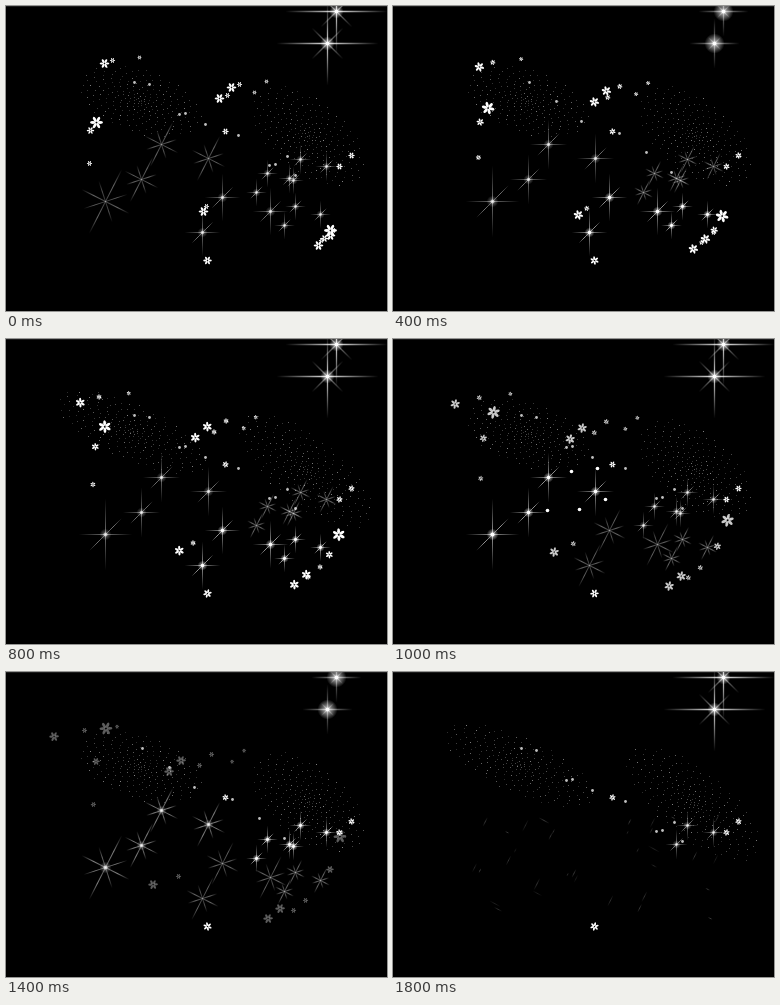
An HTML page with a canvas for the animation above (2000 ms loop, 381 by 305 pixels).

```html
<!DOCTYPE html>
<html lang="en">
<head>
<meta charset="utf-8">
<title>Night sparkle</title>
<style>
html, body { margin: 0; width: 100%; height: 100%; overflow: hidden; background: #000; }
canvas { display: block; }
</style>
</head>
<body>
<canvas id="sky" width="381" height="305"></canvas>
<script>
const canvas = document.getElementById('sky');
const ctx = canvas.getContext('2d');
const STEP = 200, STEPS = 10, TAU = Math.PI * 2;

const white = a => `rgba(255,255,255,${a})`;

function seeded(seed) {
  return () => (seed = (seed * 16807) % 2147483647) / 2147483647;
}

// Flakes drift left or rise; each big one brings smaller companions along
const flakes = [];
const addFlake = (x, y, size, rising = false) => flakes.push({ x, y, size, rising });
for (const [x, y] of [[98, 57], [225, 81], [213, 92]]) {
  addFlake(x, y, 9);
  addFlake(x + 8, y - 3, 5);
  addFlake(x + 35, y - 6, 4);
}
for (const [x, y] of [[312, 239], [324, 229], [197, 205]]) {
  addFlake(x, y, 9);
  addFlake(x + 3, y - 5, 5);
}
for (const [x, y] of [[90, 116], [324, 224]]) {
  addFlake(x, y, 12, true);
  addFlake(x - 6, y + 8, 7, true);
}
addFlake(83, 157, 5, true);
const stillFlakes = [[219, 125, 6], [201, 254, 8], [345, 149, 6], [333, 160, 6]];

// One letter per step picks the look of a whole group
const groups = [
  { modes: 'rBgBgBgRd-', reach: 25, at: [[155, 138], [202, 152], [135, 173]] },
  { modes: 'rBgBgBgRd-', reach: 36, at: [[99, 195]] },
  { modes: 'grBrBrBrd-', reach: 24, at: [[216, 191], [196, 226], [264, 205]] },
  { modes: 'grBrBrBrd-', reach: 14, at: [[289, 200], [278, 219], [314, 208]] },
  { modes: 'ggrgrgrBr-', reach: 14, at: [[250, 186], [261, 167], [287, 174]] },
  { modes: 'ggrgrgrBgg', reach: 15, at: [[283, 172], [294, 153], [320, 160]] }
];
const looks = {
  r: { turned: true, ray: .4, core: 0 },
  R: { turned: true, ray: .5, core: .6 },
  d: { turned: true, ray: .1, core: 0 },
  g: { turned: false, ray: .45, core: .55 },
  B: { turned: false, ray: .6, core: 1 }
};

const glintsA = [[128, 76], [143, 78], [173, 108], [179, 107], [199, 118], [232, 129],
  [263, 159], [269, 158], [281, 150], [289, 169]];
const glintsB = [[136, 76], [163, 95], [188, 115], [226, 127], [253, 146], [278, 166]];
const pearls = [[178, 132], [204, 129], [154, 171], [186, 170], [212, 160]];

// Dots on a golden-angle spiral, dense in the middle, squeezed and tilted
function makeCloud(count, cx, cy, rx, ry, tilt) {
  const rnd = seeded(count);
  return Array.from({ length: count }, (_, i) => {
    const r = Math.pow((i + .5) / count, .72), a = i * 2.39996;
    const u = Math.cos(a) * r * rx, v = Math.sin(a) * r * ry;
    return {
      x: Math.round(cx + u * Math.cos(tilt) - v * Math.sin(tilt)),
      y: Math.round(cy + u * Math.sin(tilt) + v * Math.cos(tilt)),
      light: .16 + .4 * rnd() * rnd()
    };
  });
}
const tightDots = [...makeCloud(215, 134, 95, 64, 32, .32), ...makeCloud(235, 302, 130, 66, 37, .68)];
const wideDots = [...makeCloud(225, 126, 93, 82, 28, .42), ...makeCloud(245, 300, 131, 82, 34, .68)];

const rnd = seeded(513);
const debris = Array.from({ length: 34 }, () => ({
  x: 80 + rnd() * 245, y: 145 + rnd() * 105, len: 2 + rnd() * 5,
  angle: rnd() < .6 ? -1.1 : .5, light: .1 + rnd() * .16
}));

function placed(x, y, angle, draw) {
  ctx.save();
  ctx.translate(x + .5, y + .5);
  ctx.rotate(angle);
  draw();
  ctx.restore();
}

function disc(x, y, r, alpha) {
  ctx.fillStyle = white(alpha);
  ctx.beginPath();
  ctx.arc(x + .5, y + .5, r, 0, TAU);
  ctx.fill();
}

// A line through the origin that fades at both ends; hollow ones dim in the middle
function ray(len, angle, alpha, hollow = false) {
  const dx = Math.cos(angle) * len, dy = Math.sin(angle) * len;
  const g = ctx.createLinearGradient(-dx, -dy, dx, dy);
  g.addColorStop(0, white(0));
  if (hollow) {
    g.addColorStop(.25, white(alpha));
    g.addColorStop(.75, white(alpha));
  }
  g.addColorStop(.5, white(hollow ? alpha * .6 : alpha));
  g.addColorStop(1, white(0));
  ctx.strokeStyle = g;
  ctx.beginPath();
  ctx.moveTo(-dx, -dy);
  ctx.lineTo(dx, dy);
  ctx.stroke();
}

function glow(radius, alpha) {
  const g = ctx.createRadialGradient(0, 0, 0, 0, 0, radius);
  g.addColorStop(0, white(alpha));
  g.addColorStop(.3, white(alpha * .55));
  g.addColorStop(1, white(0));
  ctx.fillStyle = g;
  ctx.fillRect(-radius, -radius, radius * 2, radius * 2);
}

function star(x, y, reach, { turned, ray: light, core }) {
  placed(x, y, turned ? .47 : 0, () => {
    ray(reach, Math.PI / 2, light, turned);
    ray(reach * .74, 0, light, turned);
    ray(reach * .64, -Math.PI / 4, light, true);
    if (turned) ray(reach * .6, Math.PI / 4, light * .8, true);
    if (core) glow(3 + reach * .08, core);
  });
  if (core) disc(x, y, 1 + reach * .03, core);
}

function beacon(x, y, bright) {
  placed(x, y, 0, () => {
    ctx.lineWidth = 1.3;
    ray(bright ? 51 : 25, 0, bright ? .9 : .6);
    ray(bright ? 42 : 25, Math.PI / 2, bright ? .85 : .5);
    for (const side of [-1, 1]) ray(bright ? 22 : 9, side * Math.PI / 4, .55);
    glow(bright ? 7 : 10, 1);
  });
  disc(x, y, 1.8, 1);
}

function flake(x, y, size, angle, alpha) {
  placed(x, y, angle, () => {
    ctx.fillStyle = white(alpha);
    for (let i = 0; i < 6; i++) {
      ctx.rotate(TAU / 6);
      ctx.beginPath();
      ctx.ellipse(size * .3, 0, size * .24, size * .12, 0, 0, TAU);
      ctx.fill();
    }
  });
}

function drawFlakes(step) {
  const p = step < 5 ? step * .12 : .72 + (step - 5) * .14;
  const bow = .85 * Math.sin(p * Math.PI / 1.6);
  const alpha = Math.min(1, (8.7 - step) / 4.7);
  if (alpha > 0) {
    for (const { x, y, size, rising } of flakes) {
      const along = size * p * (rising ? 5 : 5.6), aside = size * bow;
      if (rising) flake(x + aside, y - along, size, p, alpha);
      else flake(x - along, y + aside, size, p, alpha);
    }
  }
  for (const [x, y, size] of stillFlakes) flake(x, y, size, step * .2, 1);
}

function render(step) {
  const beat = step % 5;
  ctx.fillStyle = '#000';
  ctx.fillRect(0, 0, canvas.width, canvas.height);
  ctx.fillStyle = '#1c1c1c';
  ctx.fillRect(0, 0, canvas.width, 1);

  for (const { x, y, light } of beat > 2 ? wideDots : tightDots) {
    ctx.fillStyle = white(light);
    ctx.fillRect(x, y, 1, 1);
  }
  if (step > 7) {
    for (const d of debris) placed(d.x, d.y, 0, () => ray(d.len, d.angle, d.light));
  }
  for (const { modes, reach, at } of groups) {
    const look = looks[modes[step]];
    if (look) at.forEach(([x, y]) => star(x, y, reach, look));
  }
  const glints = beat === 1 || beat === 2 ? glintsB : glintsA;
  glints.forEach(([x, y]) => disc(x, y, 1.4, .75));
  if (step === 5) pearls.forEach(([x, y]) => disc(x, y, 1.8, 1));

  drawFlakes(step);
  const bright = Math.floor(step / 2) % 2 === 0;
  beacon(330, 5, bright);
  beacon(321, 37, bright);
}

let shown = -1;
function tick(now) {
  const step = Math.floor(now / STEP) % STEPS;
  if (step !== shown) render(shown = step);
  requestAnimationFrame(tick);
}
tick(0);
</script>
</body>
</html>
```
